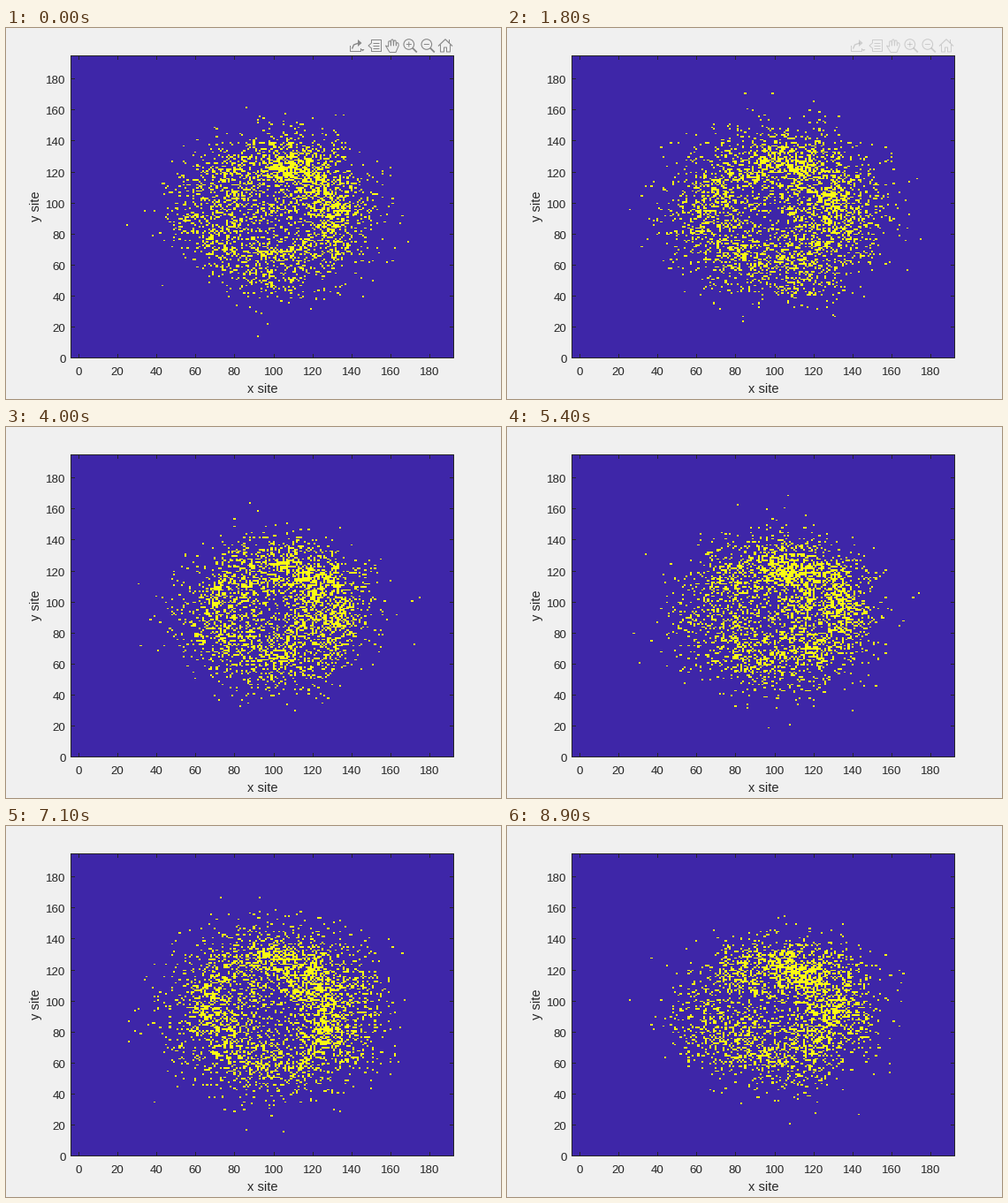
Recreate the animation shown at these times as a matplotlib script. Size 560 by 420 pixels, loop 9100 ms.

```python
import numpy as np
import matplotlib.pyplot as plt
from matplotlib.animation import FuncAnimation
from matplotlib.colors import ListedColormap
from matplotlib.patches import Circle, Polygon

W, H, DPI = 560, 420, 100
STEP, LOOP = 100, 9100
PX = 72 / DPI                                # one pixel in points
LEFT, RIGHT, TOP, BOTTOM = 73.5, 506.5, 31.5, 373.5
X0, NX, NY = -4, 196, 195                    # first column, lattice size
SX, SY = (RIGHT - LEFT) / NX, (BOTTOM - TOP) / NY
INK, GREY = "#262626", "#888888"

CENTRE = 100, 93
DENSE_SPOTS = [(124, 103), (109, 125)]
XS, YS = np.meshgrid(np.arange(NX) + X0, np.arange(NY))
RADIUS = np.hypot(XS - CENTRE[0], YS - CENTRE[1])


def crisp(v):
    """Centre of the pixel that holds v."""
    return np.floor(v) + .5


def density(t):
    """Chance of an atom on each site: a breathing ring with a thin core."""
    r = RADIUS / (.995 + .06 * np.cos(2 * np.pi * (t - 1600) / 5400))
    p = .27 * np.exp(-((r - 32) / 17) ** 2)
    p += .16 * np.exp(-(r / 40) ** 4)
    p += .025 * np.exp(-((r - 48) / 14) ** 2)
    gain = .92
    for x, y in DENSE_SPOTS:
        gain = gain + .4 * np.exp(-((XS - x) ** 2 + (YS - y) ** 2) / 400)
    return p * gain


def shot(t):
    rng = np.random.default_rng(t + 7)
    ripple = 0
    for _ in range(6):
        kx, ky = rng.normal(0, .2, 2)
        ripple = ripple + .09 * np.cos(kx * XS + ky * YS + rng.uniform(0, 6.3))
    grid = rng.random((NY, NX)) < density(t) * (1 + ripple)
    # a few lone atoms far from the cloud
    angle = rng.uniform(0, 2 * np.pi, 5)
    reach = rng.normal(74, 5, 5)
    cols = CENTRE[0] - X0 + reach * np.cos(angle)
    rows = CENTRE[1] + reach * np.sin(angle)
    grid[rows.astype(int), cols.astype(int)] = True
    return grid


def shot_start(t):
    """Start time of the picture visible at t."""
    if t < 1000:
        return 0
    if t < 6400:
        return t - (t - 1000) % 200
    if t < 6900:
        return 6400
    return t - (t - 6900) % 200


fig = plt.figure(figsize=(W / DPI, H / DPI), dpi=DPI, facecolor="#f0f0f0")
ax = fig.add_axes([0, 0, 1, 1])
ax.axis("off")
image = ax.imshow(shot(0), extent=(LEFT, RIGHT, BOTTOM, TOP), origin="lower",
                  cmap=ListedColormap(["#3e26a8", "#f9fb15"]), vmin=0, vmax=1,
                  interpolation="nearest", aspect="auto")
ax.set_xlim(0, W)
ax.set_ylim(H, 0)


def stroke(points, color=INK, width=1.0, cap="butt", join="miter"):
    xs, ys = zip(*points)
    return ax.plot(xs, ys, color=color, lw=width * PX, snap=False,
                   solid_capstyle=cap, solid_joinstyle=join)[0]


def label(x, y, text, size, **kw):
    ax.text(x, y, text, fontsize=size * PX, family="Liberation Sans",
            color=INK, va="baseline", **kw)


def draw_frame():
    stroke([(LEFT, TOP), (RIGHT, TOP), (RIGHT, BOTTOM), (LEFT, BOTTOM),
            (LEFT, TOP)], cap="projecting")
    for v in range(0, 181, 20):
        x = crisp(LEFT - .2 + (v - X0) * SX)
        y = crisp(BOTTOM - v * SY)
        for edge, inward in ((BOTTOM, -4.5), (TOP, 4.5)):
            stroke([(x, edge), (x, edge + inward)])
        for edge, inward in ((LEFT, 4.5), (RIGHT, -4.5)):
            stroke([(edge, y), (edge + inward, y)])
        label(x - .5, 393, str(v), 13.33, ha="center")
        label(67.5, y + 5.4, str(v), 13.33, ha="right")
    label(290, 413, "x site", 14.67, ha="center")
    label(38, 202, "y site", 14.67, ha="center", rotation=90,
          rotation_mode="anchor")


def draw_toolbar():
    parts = []

    def line(*points, width=1.0):
        parts.append(stroke(points, GREY, width, join="round"))

    def fill(*points):
        parts.append(ax.add_patch(Polygon(points, fc=GREY, ec="none")))

    def lens(x):
        parts.append(ax.add_patch(Circle((x, 18.5), 5.8, fill=False, ec=GREY,
                                         lw=1.1 * PX)))
        line((x + 4, 22.5), (x + 9, 27.5), width=1.8)
        line((x - 3, 18.5), (x + 3, 18.5))

    # export
    line((389.5, 20), (389.5, 26.5), (401.5, 26.5), (401.5, 23))
    line((391.5, 23.5), (393.5, 19), (399, 17), width=1.4)
    fill((398, 13), (402.5, 17), (398, 21))
    fill((401.5, 24), (405.5, 24), (403.5, 26.5))
    # data tip
    line((413.5, 17), (413.5, 13.5), (424.5, 13.5), (424.5, 26.5),
         (413.5, 26.5), (413.5, 23), (410, 20), (413.5, 17))
    for y in (17.5, 20.5, 23.5):
        line((415.5, y), (422.5, y))
    # hand
    hand = [(434, 27.5), (429.5, 20), (432.6, 21)]
    for x, tip in ((434, 14.5), (437, 12.8), (440, 13.8), (442.8, 16.5)):
        hand += [(x - 1.3, tip + 1), (x, tip), (x + 1.1, tip + 1), (x + 1.4, 20)]
    line(*hand, (441, 27.5), (434, 27.5))
    # zoom in, zoom out
    lens(455.8)
    line((455.8, 15.5), (455.8, 21.5))
    lens(475.8)
    # home
    line((489, 20.5), (497, 12.8), (505, 20.5), width=1.2)
    line((491.5, 19), (491.5, 27), (495.5, 27), (495.5, 22), (498.5, 22),
         (498.5, 27), (502.5, 27), (502.5, 19))
    line((501.5, 13), (501.5, 17))
    return parts


draw_frame()
toolbar = draw_toolbar()


def update(i):
    t = shot_start(i * STEP)
    image.set_data(shot(t))
    alpha = float(np.clip((2200 - t) / 1200, 0, 1))
    for part in toolbar:
        part.set_alpha(alpha)
    return [image, *toolbar]


anim = FuncAnimation(fig, update, frames=LOOP // STEP, interval=STEP,
                     repeat=True, repeat_delay=0, blit=False)
plt.show()
```
